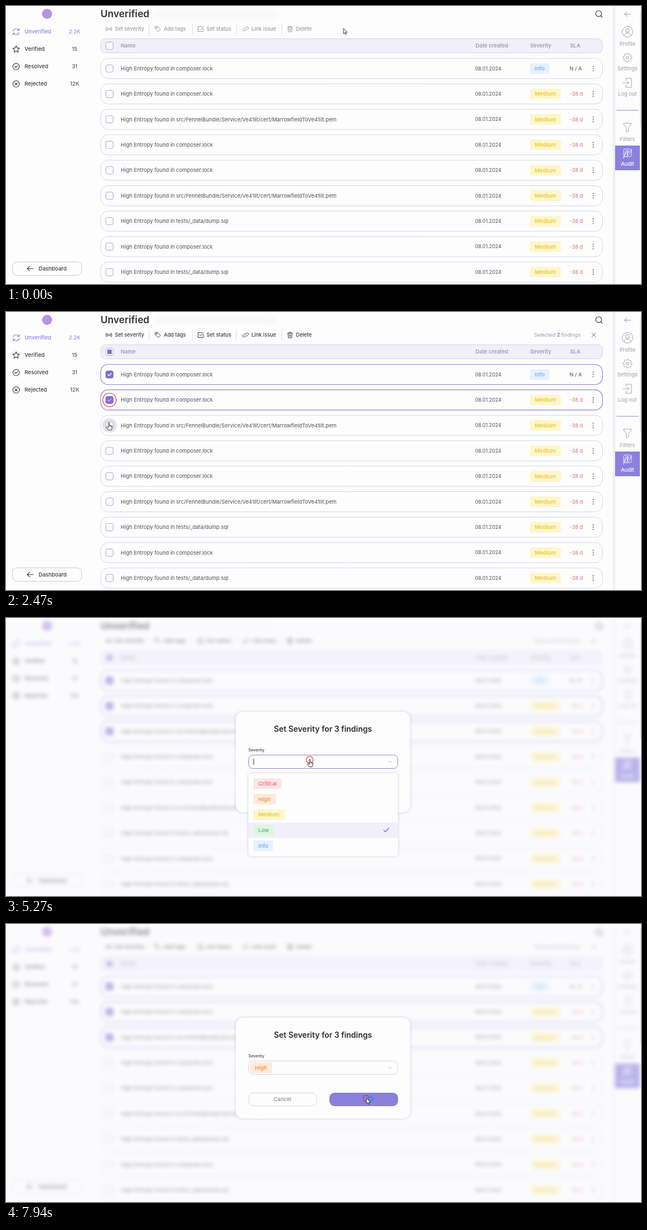
Animation of 1129 by 496 pixels, one loop 8 s. Source, as an HTML page with a canvas:

```html
<!DOCTYPE html>
<html lang="en">
<head>
<meta charset="utf-8">
<title>Set severity</title>
<style>
html, body { margin: 0; width: 100%; height: 100%; overflow: hidden; background: #fdfdfd; }
canvas { display: block; width: 1129px; height: 496px; }
</style>
</head>
<body>
<canvas id="stage" width="1129" height="496"></canvas>
<script>
const W = 1129, H = 496, LOOP = 8000;
const screen2d = document.getElementById('stage').getContext('2d');
let ctx = screen2d;

const BG = '#fdfdfd', PURPLE = '#8b80dc', DARK = '#3c3c42', GRAY = '#9c9ca6', LINE = '#d8d3e8';
const LEVELS = {
  Critical: ['#fde6e6', '#ec7676', 50],
  High: ['#fdeadb', '#f29a58', 40],
  Medium: ['#fdf6ca', '#edc73c', 56],
  Low: ['#dcf7df', '#55c877', 37],
  Info: ['#e6f1fe', '#7cb2f6', 35]
};
const FILES = {
  c: 'composer.lock',
  p: 'src/FennelBundle/Service/Ve41lit/cert/MarrowfieldToVe41lit.pem',
  d: 'tests/_data/dump.sql'
};
const rowY = i => 111.5 + 45.4 * i;

// Moments of the scenario, in ms
const CHECKS = [1600, 2200, 2750];
const OPEN = 3540, DROP = 5200, PICK = 6550, SUBMIT = 7900;
const CLICKS = [
  ...CHECKS.map((t, i) => [t, 184, rowY(i)]),
  [3490, 216, 38], [DROP, 540, 253], [PICK, 462, 321], [SUBMIT, 640, 311]
];
const PATH = [
  [0, 600, 40], [340, 600, 40], [1000, 313, 159], [1450, 183, 107], [1700, 183, 107],
  [1950, 183, 152], [2280, 183, 152], [2450, 183, 197], [2980, 183, 197],
  [3240, 223, 72], [3380, 216, 38], [3600, 216, 38], [4170, 299, 130],
  [4800, 540, 252], [5700, 540, 252], [6250, 462, 320], [6650, 462, 320],
  [7450, 641, 311], [8000, 641, 311]
];

const clamp = v => Math.max(0, Math.min(1, v));

// Hermite curve through the path; speed is zero next to a pause
function slope(k, axis) {
  const a = PATH[k - 1], b = PATH[k], c = PATH[k + 1];
  if (!a || !c) return 0;
  const still = (p, q) => p[1] === q[1] && p[2] === q[2];
  return still(a, b) || still(b, c) ? 0 : (c[axis] - a[axis]) / (c[0] - a[0]);
}
function pointer(t) {
  let k = 0;
  while (k < PATH.length - 2 && t >= PATH[k + 1][0]) k++;
  const a = PATH[k], b = PATH[k + 1], d = b[0] - a[0], u = (t - a[0]) / d;
  const at = i => {
    const u2 = u * u, u3 = u2 * u;
    return (2 * u3 - 3 * u2 + 1) * a[i] + (u3 - 2 * u2 + u) * d * slope(k, i) +
      (3 * u2 - 2 * u3) * b[i] + (u3 - u2) * d * slope(k + 1, i);
  };
  return { x: at(1), y: at(2) };
}

function text(s, x, y, size, color, weight = 400, align = 'left') {
  ctx.font = `${weight} ${size}px Inter, "Open Sans", sans-serif`;
  ctx.textAlign = align;
  ctx.fillStyle = color;
  ctx.fillText(s, x, y + size * 0.36);
}
function box(x, y, w, h, r, fill, stroke, lw = 1) {
  ctx.beginPath();
  ctx.roundRect(x, y, w, h, r);
  if (fill) { ctx.fillStyle = fill; ctx.fill(); }
  if (stroke) { ctx.strokeStyle = stroke; ctx.lineWidth = lw; ctx.stroke(); }
}
function card(x, y, w, h, r) {
  ctx.save();
  ctx.shadowColor = 'rgba(70,60,110,.25)';
  ctx.shadowBlur = 5;
  box(x, y, w, h, r, BG);
  ctx.restore();
}
function icon(x, y, d, color, lw = 1, fill) {
  const p = new Path2D(d);
  ctx.save();
  ctx.translate(x, y);
  ctx.lineCap = ctx.lineJoin = 'round';
  ctx.lineWidth = lw;
  ctx.strokeStyle = color;
  if (fill) { ctx.fillStyle = fill; ctx.fill(p); }
  ctx.stroke(p);
  ctx.restore();
}
function disc(x, y, r, color) {
  ctx.beginPath();
  ctx.arc(x, y, r, 0, 7);
  ctx.fillStyle = color;
  ctx.fill();
}
const ring = (r, x = 0, y = 0) => `M${x - r} ${y}a${r} ${r} 0 1 0 ${2 * r} 0a${r} ${r} 0 1 0 ${-2 * r} 0`;
const rule = (x, y, w, h, color) => { ctx.fillStyle = color; ctx.fillRect(x, y, w, h); };

const TICK = 'M-3 .2L-.8 2.3 3.2-2';
const CROSS = 'M-2-2L2 2M2-2L-2 2';
const BACK = 'M5.5 0H-5M-1-4.2L-5.2 0-1 4.2';
const REFRESH = 'M-5.6-1A5.7 5.7 0 0 1 4.6-3M5.4-6V-2.6H2M5.6 1A5.7 5.7 0 0 1-4.6 3M-5.4 6V2.6H-2';
const STAR = 'M0-6L1.8-2.1 6-1.6 2.9 1.3 3.7 5.6 0 3.5-3.7 5.6-2.9 1.3-6-1.6-1.8-2.1Z';
const HAND = 'M-1 .8C-1-.3 1-.3 1 .8V5.2L4.6 6C5.6 6.3 5.9 6.9 5.8 7.8L5.2 11.2 4.6 13.6H-1.2L-4.4 8.9C-4.8 7.9-3.6 7.2-2.7 8L-1 9.4Z';
const ARROW = 'M0 0V9.5L2.2 7.5 3.8 10.8 5.2 10.1 3.7 7H6.4Z';
const GEAR = (() => {
  let d = '';
  for (let i = 0; i < 32; i++) {
    const r = i % 4 < 2 ? 8 : 6.3, a = i * Math.PI / 16;
    d += `${i ? 'L' : 'M'}${r * Math.cos(a)} ${r * Math.sin(a)}`;
  }
  return d + 'Z' + ring(2.6);
})();

const TOOLS = [
  [183, 'Set severity', ring(1) + 'M-2.4-2.4Q-4 0-2.4 2.4M2.4-2.4Q4 0 2.4 2.4M-4.2-3.4Q-6.4 0-4.2 3.4M4.2-3.4Q6.4 0 4.2 3.4'],
  [270, 'Add tags', 'M-4.5-4.5H-.5L4.7 .7 .7 4.7-4.5-.5Z' + ring(.9, -2, -2)],
  [346, 'Set status', 'M2-4.5H-4.5V4.5H4.5V-1M-2.3-.5L-.3 1.5 4.6-4'],
  [426, 'Link issue', 'M-1 2.4L-2.4 3.8A2.2 2.2 0 0 1-5 1L-2.2-1.7A2.2 2.2 0 0 1 1-1.2M1-2.4L2.4-3.8A2.2 2.2 0 0 1 5-1L2.2 1.7A2.2 2.2 0 0 1-1 1.2'],
  [505, 'Delete', 'M-4.5-3H4.5M-1.7-3V-5H1.7V-3M-3.5-3L-3 5H3L3.5-3M-1-.7V2.8M1-.7V2.8']
];
const MENU = [
  ['Unverified', '2.2K', REFRESH],
  ['Verified', '15', STAR],
  ['Resolved', '31', ring(5.7) + 'M-2.5 0L-.6 1.9 2.7-1.8'],
  ['Rejected', '12K', ring(5.7) + CROSS]
];
const SIDE = [
  [46, 68, 'Profile', ring(9.5) + ring(3.5, 0, -2.5) + 'M-6 6.8Q-5 2.2 0 2.2T6 6.8'],
  [92, 112, 'Settings', GEAR],
  [137, 156.5, 'Log out', 'M-3-4V-8H7V8H-3V4M-8 0H2.5M-.5-3L2.5 0-.5 3'],
  [217, 237.5, 'Filters', 'M-6.5-8H6.5V-5.5L2-.5V5.5L-2 8V-.5L-6.5-5.5Z']
];

function pill(name, x, y, pad = 8.5, w = LEVELS[name][2]) {
  const [bg, fg] = LEVELS[name];
  box(x, y - 9.5, w, 19, 3, bg);
  text(name, x + pad, y, 9.6, fg, 600);
}

function sidebars() {
  disc(73, 14, 9, '#b993e3');
  MENU.forEach(([label, count, d], i) => {
    const y = 46 + 31 * i, c = i ? DARK : PURPLE;
    icon(18, y, d, c, 1.1);
    text(label, 33, y, 9.6, c, 500);
    text(count, 122, y, 9.5, c, 400, 'center');
  });
  box(11.5, 456.5, 123, 24, 8, BG, '#cbc5e0');
  icon(43, 468.5, BACK, DARK, 1.1);
  text('Dashboard', 58, 468.5, 9.6, DARK, 500);

  const edge = ctx.createLinearGradient(1077, 0, 1084, 0);
  edge.addColorStop(0, 'rgba(220,216,238,0)');
  edge.addColorStop(1, 'rgba(220,216,238,.7)');
  rule(1077, 0, 6, H, edge);
  icon(1105, 14.5, BACK, '#9a93bd');
  for (const [iy, ty, label, d] of SIDE) {
    icon(1105, iy, d, '#a5a2b2');
    text(label, 1105, ty, 9.3, GRAY, 400, 'center');
  }
  rule(1085.5, 185.5, 39, 1.3, '#a3a9c5');
  rule(1083, 249, 44, 44, PURPLE);
  icon(1105, 262, 'M-4-7H4Q7-7 7-4V4Q7 7 4 7H-4Q-7 7-7 4V-4Q-7-7-4-7M-4 0Q-5-4-1-4T0 0 4-3 4 1 0 0-4 3-4 0M0 0V4', '#eeeaff');
  text('Audit', 1105, 281.5, 9.4, '#fff', 500, 'center');
}

function checkbox(y, on, fresh) {
  box(177.5, y - 6.5, 13, 13, 3, on ? '#7d70d2' : BG, on ? '#7d70d2' : '#aaa1e0');
  if (on) icon(184, y, TICK, fresh ? '#f3a9b8' : '#fff', 1.4);
}

function toolbar(n) {
  for (const [x, label, d] of TOOLS) {
    const c = n ? DARK : GRAY;
    icon(x, 41, d, c);
    text(label, x + 10.5, 41, 9.2, c, 500);
  }
  for (const x of [254, 331, 409, 490]) rule(x, 32, 1, 19, '#dedde4');
  if (!n) return;
  text('Selected ', 939, 41, 9.1, GRAY);
  let x = 939 + ctx.measureText('Selected ').width;
  text(n, x, 41, 9.1, PURPLE, 700);
  x += ctx.measureText(n + ' ').width;
  text('findings', x, 41, 9.1, GRAY);
  icon(1045, 41, 'M-3.5-3.5L3.5 3.5M3.5-3.5L-3.5 3.5', '#77747f');
}

function page(t) {
  const n = CHECKS.filter(c => t >= c).length, p = pointer(t);
  rule(0, 0, W, H, BG);
  sidebars();
  text('Unverified', 168, 14, 17.3, '#333338', 600);
  ctx.save();
  ctx.filter = 'blur(4px)';
  rule(266, 11, 214, 9, '#f6f6f7');
  ctx.restore();
  icon(1054, 14, ring(5.2, -.3, -.3) + 'M3.5 3.5L6 6', DARK, 1.2);
  toolbar(n);

  box(168.5, 58.5, 892, 25, 8, '#f1effa', '#d8d2ec');
  checkbox(71, false);
  if (n) box(180, 67, 8, 8, 1, '#7d70d2');
  [['Name', 204], ['Date created', 835], ['Severity', 932], ['SLA', 1003]]
    .forEach(([s, x]) => text(s, x, 71, 9.4, GRAY, 600));

  [...'ccpccpdcd'].forEach((key, i) => {
    const y = rowY(i), on = i < n;
    const inside = t < OPEN && Math.abs(p.y - y) < 18 && p.x > 169 && p.x < 1060;
    const onBox = inside && p.x < 198;
    box(168.5, y - 18, 892, 36, 13, inside && !onBox && !on ? '#f4f4f4' : BG, on ? '#9085d8' : LINE, on ? 1.2 : 1);
    const focus = i === 2 && on && t < 3450;
    if (onBox || focus) disc(184, y, 13, 'rgba(60,60,70,.12)');
    checkbox(y, on, on && t - CHECKS[i] < 550);
    text('High Entropy found in ' + FILES[key], 204, y, 9.4, '#505056');
    text('08.01.2024', 834, y, 8.8, '#505056');
    if (i) pill('Medium', 931.5, y, 8.5, 55);
    else pill('Info', 931.5, y);
    text(i ? '-38 d' : 'N / A', 1002, y, 9.2, i ? '#df7373' : '#505056');
    for (const k of [-4, 0, 4]) disc(1044, y + k, 1.1, '#77747f');
  });
}

function modal(t) {
  const open = t >= DROP && t < PICK, sent = t >= SUBMIT, p = pointer(t);
  card(408.5, 167, 310, 180, 13);
  text('Set Severity for 3 findings', 563.5, 198, 13.9, '#2c2c31', 600, 'center');
  text('Severity', 431, 235, 7.2, DARK, 500);
  box(431.5, 244.5, 265, 24, 7, BG, open ? '#9087d0' : LINE);
  icon(683, 256.5, open ? 'M-3 1.5L0-1.5 3 1.5' : 'M-3-1.5L0 1.5 3-1.5', '#bbb8c4');
  if (!open) {
    const name = t < PICK ? 'Low' : 'High';
    pill(name, 434, 256.5, 8.5, name === 'Low' ? 36 : 39);
  } else if ((t - DROP) % 1000 < 500) {
    rule(440, 251, 1, 11, DARK);
  }
  box(431.5, 301.5, 121, 23, 9, BG, LINE);
  text('Cancel', 491.5, 313, 9.4, sent ? '#8a8a91' : '#505056', 500, 'center');
  box(575, 301, 122, 24, 9, PURPLE);
  if (!sent) text('Submit', 635.5, 313, 9.5, '#fff', 600, 'center');
  if (!open) return;

  card(431, 277, 266, 148, 5);
  Object.keys(LEVELS).forEach((name, i) => {
    const y = 295.5 + 27.7 * i;
    if (name === 'Low') rule(431, y - 13.8, 266, 27.6, '#f2effb');
    else if (Math.abs(p.y - y) < 13.8) rule(431, y - 13.8, 266, 27.6, '#f3f3f2');
    pill(name, 440, y);
  });
  icon(676, 378.5, 'M-4.5 0L-1.5 3 4.5-3.5', '#7d70d2', 1.3);
}

function layer(draw) {
  const c = document.createElement('canvas');
  c.width = W;
  c.height = H;
  ctx = c.getContext('2d');
  draw();
  ctx = screen2d;
  return c;
}
let backdrop;
function makeBackdrop() {
  const sharp = layer(() => page(OPEN));
  backdrop = layer(() => {
    rule(0, 0, W, H, BG);
    ctx.filter = 'blur(3.5px)';
    ctx.drawImage(sharp, 0, 0);
    ctx.filter = 'none';
    rule(0, 0, W, H, 'rgba(248,248,255,.42)');
  });
}

function cursor(t) {
  const p = pointer(t);
  for (const [start, x, y] of CLICKS) {
    const age = t - start;
    if (age >= 0 && age < 320) icon(x, y, ring(4 + 8 * clamp(age / 270)), start === SUBMIT ? '#cf3078' : '#e4564f', 1.4);
  }
  if (t >= SUBMIT) icon(649, 312, ring(3.6), '#2c90da', 2.2);
  const hand = p.y > 58 && t < SUBMIT || t > 2000 && t < SUBMIT;
  icon(p.x, p.y, hand ? HAND : ARROW, '#3a3a3e', 1, '#fff');
  if (hand) icon(p.x, p.y, 'M1 5V7.5M2.9 5.8V7.8M4.6 6.3V8', '#3a3a3e', .7);
}

function frame(now) {
  const t = now % LOOP;
  if (t < OPEN + 160) page(t);
  if (t >= OPEN) {
    ctx.globalAlpha = clamp((t - OPEN) / 160);
    ctx.drawImage(backdrop, 0, 0);
    modal(t);
    ctx.globalAlpha = 1;
  }
  rule(1127.5, 8, 1, 207, '#d4dcda');
  cursor(t);
}

makeBackdrop();
const begin = performance.now();
(function tick() {
  frame(performance.now() - begin);
  requestAnimationFrame(tick);
})();
</script>
</body>
</html>
```
